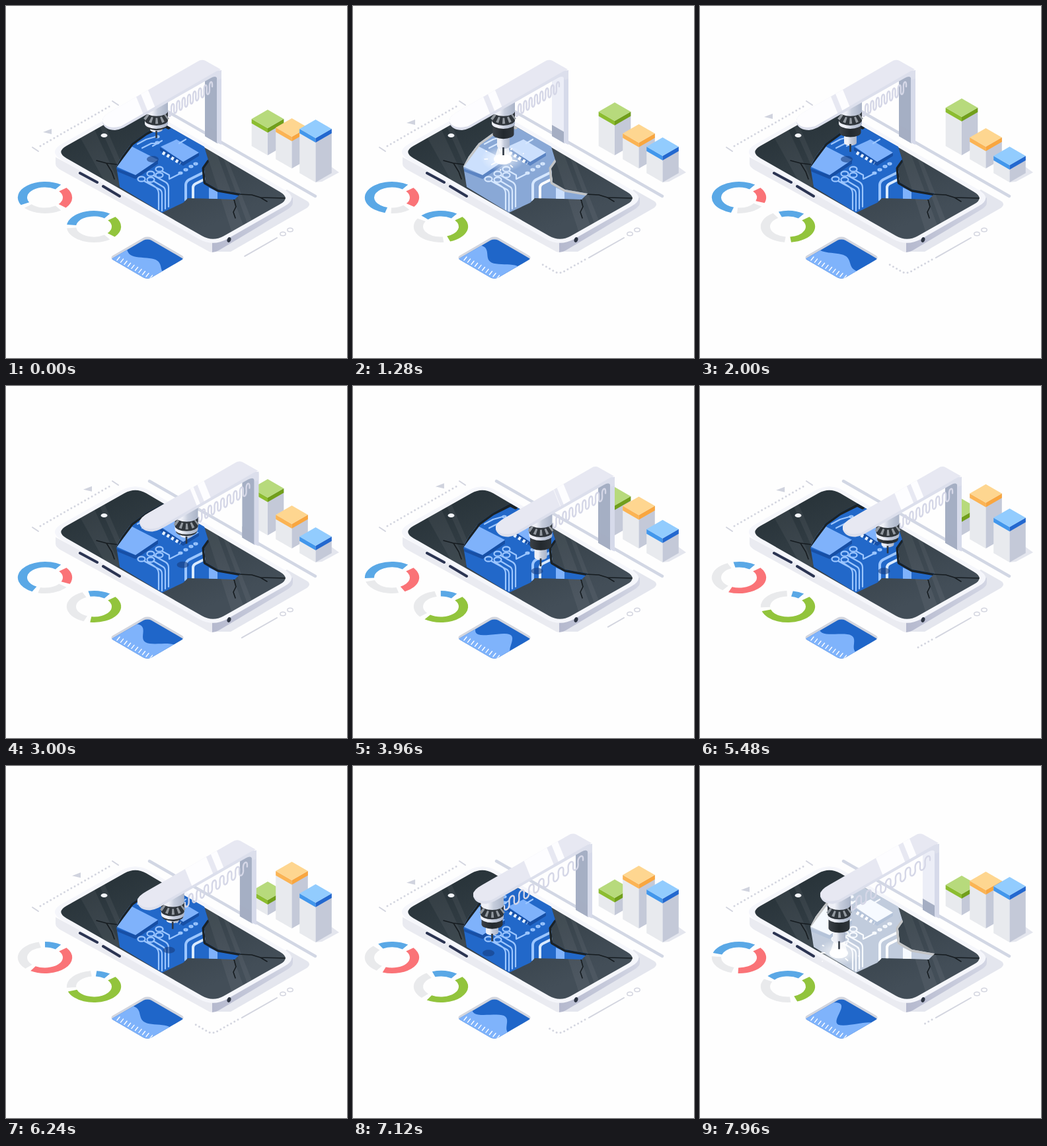
Recreate the animation shown at these times as an HTML page. Size 516x533 px, loop 8000 ms.

```html
<!DOCTYPE html>
<html lang="en">
<head>
<meta charset="utf-8">
<title>Phone repair</title>
<style>
html, body { margin: 0; width: 100%; height: 100%; overflow: hidden; background: #fefefe; }
svg { display: block; width: 100vw; height: 100vh; }
.line { fill: none; stroke-linecap: round; stroke-linejoin: round; }
.rule { stroke: #d3d5df; stroke-width: 2; }
.crack { stroke: #161c20; stroke-width: 1.6; }
.trace { stroke-width: 2.2; }
</style>
</head>
<body>
<svg viewBox="0 0 516 533">
  <defs>
    <clipPath id="screenClip"><path id="screenShape"/></clipPath>
    <clipPath id="holeClip"><path d="M172 274L167 243L175 228L190 208L212 192L238 178L300 213L307 236L300 246L302 267L321 278L355 284L346 293L318 292L275 291L268 298L236 313Z"/></clipPath>
    <clipPath id="beamClip"><path id="beamTop" d="M290 84L160 159Q142 169 147 177Q154 187 174 182L318 99L325 96L302 83Q296 80 290 84Z"/></clipPath>
    <clipPath id="cardClip"><rect width="1" height="1" rx=".1" transform="matrix(58 33.5 58 -33.5 156 381)"/></clipPath>
    <linearGradient id="glass" gradientUnits="userSpaceOnUse" x1="190" y1="160" x2="270" y2="350"><stop offset="0" stop-color="#29343a"/><stop offset="1" stop-color="#434e58"/></linearGradient>
    <linearGradient id="metal"><stop offset=".3" stop-color="#eef0f7"/><stop offset=".55" stop-color="#c6cddc"/><stop offset="1" stop-color="#aab4c8"/></linearGradient>
    <linearGradient id="rubber"><stop offset="0" stop-color="#3b4147"/><stop offset=".5" stop-color="#23292e"/><stop offset="1" stop-color="#2f353b"/></linearGradient>
    <linearGradient id="rightSide"><stop offset="0" stop-color="#b5b9ce"/><stop offset="1" stop-color="#d3d6e4"/></linearGradient>
    <radialGradient id="halo"><stop offset=".3" stop-color="#fff"/><stop offset="1" stop-color="#fff" stop-opacity="0"/></radialGradient>
  </defs>

  <!-- rulers -->
  <g class="line rule">
    <path d="M40 214L49 220M161 144L170 150"/>
    <path d="M52 212L160 150" stroke-width="3" stroke-dasharray="0 6"/>
    <line id="measure" x1="410" y1="351"/>
    <ellipse cx="419" cy="345" rx="4.2" ry="2.8" stroke-width="1.5"/>
    <ellipse cx="430" cy="339" rx="4.2" ry="2.8" stroke-width="1.5"/>
  </g>
  <path id="dotPath" d="M351 384L319 402Q312 406 305 402L286 391" fill="none"/>
  <g id="dots" fill="#d3d5df"></g>
  <path id="marker" d="M-13 5L0 0V8Z" fill="#d0d3de"/>
  <path class="line" d="M217 144L468 288" stroke="#d2d7e4" stroke-width="4.5"/>

  <g id="donuts"></g>

  <!-- area chart card -->
  <g clip-path="url(#cardClip)">
    <rect x="150" y="340" width="130" height="80" fill="#d2d5de"/>
    <g transform="matrix(58 33.5 58 -33.5 156 385)">
      <rect width="1" height="1" rx=".1" fill="#1f66c9"/>
      <path id="wave" fill="#7fb3fb"/>
    </g>
    <path id="ticks" class="line" stroke="#fff" stroke-width="1.4"/>
  </g>

  <path d="M468 267L493 244L504 252L478 266Z" fill="#e4e6ee"/>
  <g id="bars"></g>

  <!-- phone -->
  <path d="M425 278L455 295Q463 300 455 306L340 372H312Z" fill="#e4e6ee"/>
  <path d="M75 229V239Q75 244 84 249L304 370Q308 373 312 373V355Z" fill="#eaebf1"/>
  <path d="M312 355V373Q317 373 322 370L426 308Q434 303 434 298V290Z" fill="url(#rightSide)"/>
  <path id="rim" fill="#f5f6fb"/>
  <path class="line" d="M112 253L138 267M147 273L172 288" stroke="#2b3452" stroke-width="4"/>
  <ellipse cx="337.5" cy="354" rx="2.8" ry="4" fill="#2c3442" transform="rotate(20 337.5 354)"/>
  <use href="#screenShape" fill="url(#glass)"/>
  <g clip-path="url(#screenClip)">
    <path d="M110 195L132 183L172 270L160 285ZM140 178L147 174L185 262L180 268ZM296 200L314 210L362 340L344 350ZM322 212L329 216L374 330L367 334Z" fill="#fff" opacity=".05"/>
    <path class="line crack" d="M137 234L152 238L168 240M152 238L160 251L164 262M352 285L372 286L385 290L424 291M345 293L348 304L344 312L347 321M385 290L395 296"/>
  </g>
  <ellipse cx="148.5" cy="196" rx="5" ry="3" fill="#f4f6fa"/>
  <g clip-path="url(#holeClip)">
    <rect id="board" x="160" y="170" width="200" height="150"/>
    <path id="chipSide" d="M167 246L196 256L230 233V239L196 262L167 250ZM233 214L268 236L292 222V227L268 242L233 219Z" fill="#174fa5"/>
    <path id="chips" d="M187 211L230 233L196 256L164 242ZM234 213L258 202L292 222L268 236ZM307 275L320 281V296H307Z"/>
    <g id="traces" class="line trace">
      <path d="M209 265L233 278Q236 280 236 285V310M223 265L238 274Q241 276 241 281V307M224 257L242 267Q246 270 246 275V304M236 250L247 256V262L265 253M214 266L226 274Q231 278 231 284V308M199 209L212 202L226 198M206 215L220 208H229M222 212L236 204M262 208L272 202"/>
      <path d="M305 249L277 263Q272 266 272 271V294" stroke-width="4"/>
      <g id="nodes"></g>
    </g>
    <path id="pads" class="line" d="M305 260L287 269Q283 271 283 275V294" stroke-width="4"/>
    <path id="pins" class="line" d="M237 222L264 238" stroke-width="5" stroke-dasharray="4 3.7" style="stroke-linecap:butt"/>
    <ellipse id="shadow" cx="222" cy="232" rx="9" ry="5" fill="#173f80"/>
    <path id="glassEdge" class="line" d="M164 243L175 228L190 208L212 192L238 179L246 183M307 236L300 246L302 267L321 278L356 284" stroke-width="7"/>
  </g>

  <g id="glow">
    <ellipse cx="227" cy="231" rx="34" ry="20" fill="url(#halo)" opacity=".6"/>
    <ellipse cx="227" cy="232" rx="14" ry="8" fill="#fff"/>
    <path d="M220 212H235L240 231H214Z" fill="#fff" opacity=".8"/>
    <path id="sparks" class="line" stroke="#fff" stroke-width="1.8"/>
  </g>

  <!-- gantry -->
  <g id="gantry">
    <path id="post" d="M301 108L320 98V208L301 197Z"/>
    <path d="M301 180L320 191V208L301 197Z" fill="#a5aec3"/>
    <path d="M319 100L326 97V210L319 207Z" fill="#d6daea"/>
    <path id="spring" class="line" stroke="#d5d7e7" stroke-width="2.4"/>
    <g id="head">
      <path id="nozzle" fill="url(#metal)"/>
      <line id="needle" x1="227.5" x2="227.5" stroke="#2f3742" stroke-width="2.6"/>
      <path id="barrel" fill="url(#rubber)"/>
      <path id="collar" fill="url(#metal)"/>
      <path id="ring" fill="#30363c"/>
      <path d="M211 167Q227.5 181 244 167" fill="none" stroke="#92989f" stroke-width="9" stroke-dasharray="3.5 5"/>
      <path id="housing" fill="url(#metal)"/>
    </g>
    <path d="M146 171V177Q150 188 165 188Q172 187 178 184L310 109Q319 104 320 112L326 110V100Q325 95 316 99L174 176Z" fill="#dcdfec"/>
    <use href="#beamTop" fill="#e7e8f2"/>
    <g clip-path="url(#beamClip)" fill="#fdfdff"><path id="shineWide"/><path id="shineThin"/></g>
  </g>
</svg>
<script>
const $ = id => document.getElementById(id);
const set = (el, attrs) => { for (const k in attrs) el.setAttribute(k, attrs[k]); return el; };
const add = (parent, tag, attrs) =>
  set(parent.appendChild(document.createElementNS('http://www.w3.org/2000/svg', tag)), attrs);
const clamp = (x, lo = 0, hi = 1) => Math.min(hi, Math.max(lo, x));
const ramp = (t, start, length) => clamp((t - start) / length);
const ease = p => p < .5 ? 4 * p ** 3 : 1 - 4 * (1 - p) ** 3;
const TAU = Math.PI * 2, LOOP = 8000;

// smooth curve through values at shared key times
const KEYS = [0, 1280, 2000, 3000, 4720, 6240, 7960];
function curve(v, t) {
  let i = 0;
  while (i < 5 && t > KEYS[i + 1]) i++;
  const h = KEYS[i + 1] - KEYS[i], p = (t - KEYS[i]) / h;
  const slope = j => {
    const a = Math.max(j - 1, 0), b = Math.min(j + 1, 6);
    return (v[b] - v[a]) / (KEYS[b] - KEYS[a]) * h;
  };
  const q = p * p, c = q * p;
  return (2 * c - 3 * q + 1) * v[i] + (c - 2 * q + p) * slope(i)
    + (3 * q - 2 * c) * v[i + 1] + (c - q) * slope(i + 1);
}

function mix(a, b, k) {
  const part = (n, s) => (n >> s) & 255;
  return `rgb(${[16, 8, 0].map(s => Math.round(part(a, s) + (part(b, s) - part(a, s)) * k))})`;
}

function rounded(points, d) {
  const toward = (a, b) => {
    const k = d / Math.hypot(b[0] - a[0], b[1] - a[1]);
    return [a[0] + (b[0] - a[0]) * k, a[1] + (b[1] - a[1]) * k];
  };
  const n = points.length;
  return points.map((p, i) =>
    `${i ? 'L' : 'M'}${toward(p, points[(i + n - 1) % n])}Q${p} ${toward(p, points[(i + 1) % n])}`).join('') + 'Z';
}

function cylinder(x1, x2, top, bottom) {
  const r = (x2 - x1) / 2;
  return `M${x1} ${top}V${bottom}A${r} ${r * .45} 0 0 0 ${x2} ${bottom}V${top}Z`;
}

function ringPart(cx, cy, from, to) {
  const at = (rx, ry, deg) => {
    const a = deg * TAU / 360;
    return `${cx + rx * Math.cos(a)} ${cy + ry * Math.sin(a)}`;
  };
  const large = to - from > 180 ? 1 : 0;
  return `M${at(41.2, 24, from)}A41.2 24 0 ${large} 1 ${at(41.2, 24, to)}`
    + `L${at(27, 15.5, to)}A27 15.5 0 ${large} 0 ${at(27, 15.5, from)}Z`;
}

// still parts
set($('screenShape'), { d: rounded([[75, 221], [196, 153], [431, 291], [313, 357.5]], 19) });
set($('rim'), { d: rounded([[63, 221], [196, 146], [443, 291], [313, 365]], 25) });
set($('collar'), { d: cylinder(210, 245, 160, 178) });
set($('ring'), { d: cylinder(210, 245, 160, 173) });
set($('housing'), { d: cylinder(210.5, 245, 138, 159) });
set($('ticks'), { d: Array.from({ length: 10 }, (_, i) => `M${168 + i * 5.5} ${385 + i * 3.1}l4 -5`).join('') });
for (const [x, y] of [[205, 262], [219, 263], [219, 254], [232, 247], [232, 256]])
  add($('nodes'), 'ellipse', { cx: x, cy: y, rx: 5.5, ry: 3.7 });
for (const [x, y] of [[229, 198], [229, 207], [272, 248], [280, 243], [287, 239], [264, 253]])
  add($('nodes'), 'ellipse', { cx: x, cy: y, rx: 2.5, ry: 1.3 });
const dots = Array.from({ length: 13 }, (_, i) => {
  const p = $('dotPath').getPointAtLength(i * 6);
  return add($('dots'), 'circle', { cx: p.x, cy: p.y, r: 1.5 });
});

const donuts = [
  { x: 59, y: 290, color: '#fa7377', start: [152, 105, 107, 118, 225, 270, 197], end: [40, 36, 20, 24, 92, 122, 92] },
  { x: 133, y: 334, color: '#92c43c', start: [187, 224, 250, 258, 277, 276, 222], end: [40, 70, 83, 98, 147, 162, 70] }
];
for (const d of donuts)
  d.parts = ['#5aa8e6', d.color, '#e9eaec'].map(fill => add($('donuts'), 'path', { fill }));

const bars = [
  { x: 396, base: 226, colors: ['#b7da7c', '#8cbd30', '#719f1b'], top: [157, 146, 140, 141, 163, 175, 166] },
  { x: 432.5, base: 246, colors: ['#fed690', '#fbb454', '#f9a63f'], top: [170, 179, 185, 181, 157, 145, 160] },
  { x: 468.5, base: 267, colors: ['#92ccfe', '#4297ec', '#2368cf'], top: [172, 199, 213, 214, 193, 179, 168] }
];
for (const b of bars)
  b.faces = ['#e8eaee', '#c4c9d8', b.colors[1], b.colors[2], b.colors[0]].map(fill => add($('bars'), 'path', { fill }));

function drawCharts(t) {
  for (const d of donuts) {
    const start = curve(d.start, t), end = curve(d.end, t);
    [[start, 306], [-38, end], [end + 14, start - 13]].forEach(([a, b], i) =>
      set(d.parts[i], { d: ringPart(d.x, d.y, a, b) }));
  }
  for (const b of bars) {
    const y = curve(b.top, t), side = (from, to, dir) =>
      `M${b.x} ${from + 28}L${b.x + 24.3 * dir} ${from + 14}V${to - 14}L${b.x} ${to}Z`;
    [side(y, b.base, -1), side(y, b.base, 1), side(y, y + 34.8, -1), side(y, y + 34.8, 1),
      `M${b.x} ${y}l24.3 14l-24.3 14l-24.3 -14Z`].forEach((d, i) => set(b.faces[i], { d }));
  }
  const peak = curve([.62, .95, 1.35, 1.87, 2.8, 3.65, 4.6], t);
  const amp = curve([.11, .13, .1, .16, .22, .11, .25], t);
  const mean = curve([.51, .54, .55, .59, .63, .53, .61], t);
  let d = 'M0 0';
  for (let u = 0; u <= 1.001; u += .04) d += `L${u} ${mean + amp * Math.cos(TAU * (u - peak) / .9)}`;
  set($('wave'), { d: d + 'L1 0Z' });
}

function drawRulers(t) {
  const x = curve([69, 94, 110, 130, 138, 113, 75], t);
  set($('marker'), { transform: `translate(${x} ${186 - (x - 69) * .563})` });
  const length = clamp(curve([56, 150, 150, 62, 29, 150, 80], t), 0, 150);
  const solid = Math.min(length, 61);
  set($('measure'), { x2: 410 - solid * .87, y2: 351 + solid * .495 });
  dots.forEach((dot, i) => set(dot, { opacity: length > 65 + i * 6 ? 1 : 0 }));
}

function drawMachine(t) {
  const first = ease(ramp(t, 2480, 820));
  const rail = 70 * first - 34 * ease(ramp(t, 5830, 820));
  const slide = -13.5 * first - 39.5 * ease(ramp(t, 5870, 820));
  const headX = rail + slide, headY = (rail - slide) * .577;
  let reach = 0, lit = 0;
  for (const arrival of [0, 3300, 6650]) {
    const w = t - arrival;
    reach += ease(ramp(w, 100, 720)) - ease(ramp(w, 1750, 680));
    lit += ramp(w, 850, 150) - ramp(w, 1600, 150);
  }
  const bleach = lit * (t > 6650 ? .93 : .6);
  const at = `translate(${headX} ${headY})`;

  set($('gantry'), { transform: `translate(${rail} ${rail * .577})` });
  set($('head'), { transform: `translate(${slide} ${-slide * .577})` });
  set($('barrel'), { d: cylinder(211.5, 243.5, 175, 181 + 13 * reach) });
  set($('nozzle'), { d: cylinder(218, 237, 180, 187 + 25 * reach) });
  set($('needle'), { y1: 189 + 25 * reach, y2: 200 + 26 * reach });
  set($('post'), { fill: mix(0xa5afc4, 0xeceef7, lit) });

  // meander: x rests on the legs and runs along the bends
  const x0 = 246 + slide, y0 = 160 - slide * .577, loops = 8;
  let d = '';
  for (let i = 0; i <= 192; i++) {
    const a = TAU * loops * i / 192, p = (a - .6 * Math.sin(2 * a)) / (TAU * loops);
    d += `${i ? 'L' : 'M'}${x0 + (312 - x0) * p} ${y0 + (122 - y0) * p + 8 * Math.sin(a)}`;
  }
  set($('spring'), { d });

  const band = (id, a, b) => {
    const y = x => 81 + (295 - x) * .577;
    set($(id), { d: `M${a - 2} ${y(a) - 5}L${b - 2} ${y(b) - 5}L${b + 11} ${y(b) + 27}L${a + 11} ${y(a) + 27}Z` });
  };
  band('shineWide', curve([138, 138, 140, 222, 231, 218, 230], t), curve([197, 197, 198, 227, 236, 250, 264], t));
  band('shineThin', curve([204, 204, 205, 233, 241, 257, 271], t), curve([215, 215, 216, 243, 251, 266, 281], t));

  set($('board'), { fill: mix(0x2268c9, 0xcdd3df, bleach) });
  set($('chipSide'), { opacity: 1 - bleach });
  set($('chips'), { fill: mix(0x7fb2fb, 0xffffff, bleach) });
  set($('traces'), { stroke: mix(0x9cc6ff, 0xffffff, bleach) });
  set($('pads'), { stroke: mix(0xd9eaff, 0xffffff, lit) });
  set($('pins'), { stroke: mix(0xe6f1ff, 0xffffff, lit) });
  set($('glassEdge'), { stroke: mix(0x1b2226, 0xc3c4c5, lit) });
  set($('shadow'), { transform: at, opacity: .6 * (1 - lit) });

  set($('glow'), { transform: at, opacity: lit });
  let rays = '';
  for (let i = 0; i < 9; i++) {
    const a = i * TAU / 9 + .3, p = (t / 320 + i * .37) % 1, r = 14 + 20 * p, end = r + 8 * (1 - p);
    rays += `M${227 + r * Math.cos(a)} ${231 + r * .58 * Math.sin(a)}L${227 + end * Math.cos(a)} ${231 + end * .58 * Math.sin(a)}`;
  }
  set($('sparks'), { d: rays });
}

function frame() {
  const t = performance.now() % LOOP;
  drawCharts(t);
  drawRulers(t);
  drawMachine(t);
  requestAnimationFrame(frame);
}
frame();
</script>
</body>
</html>
```
